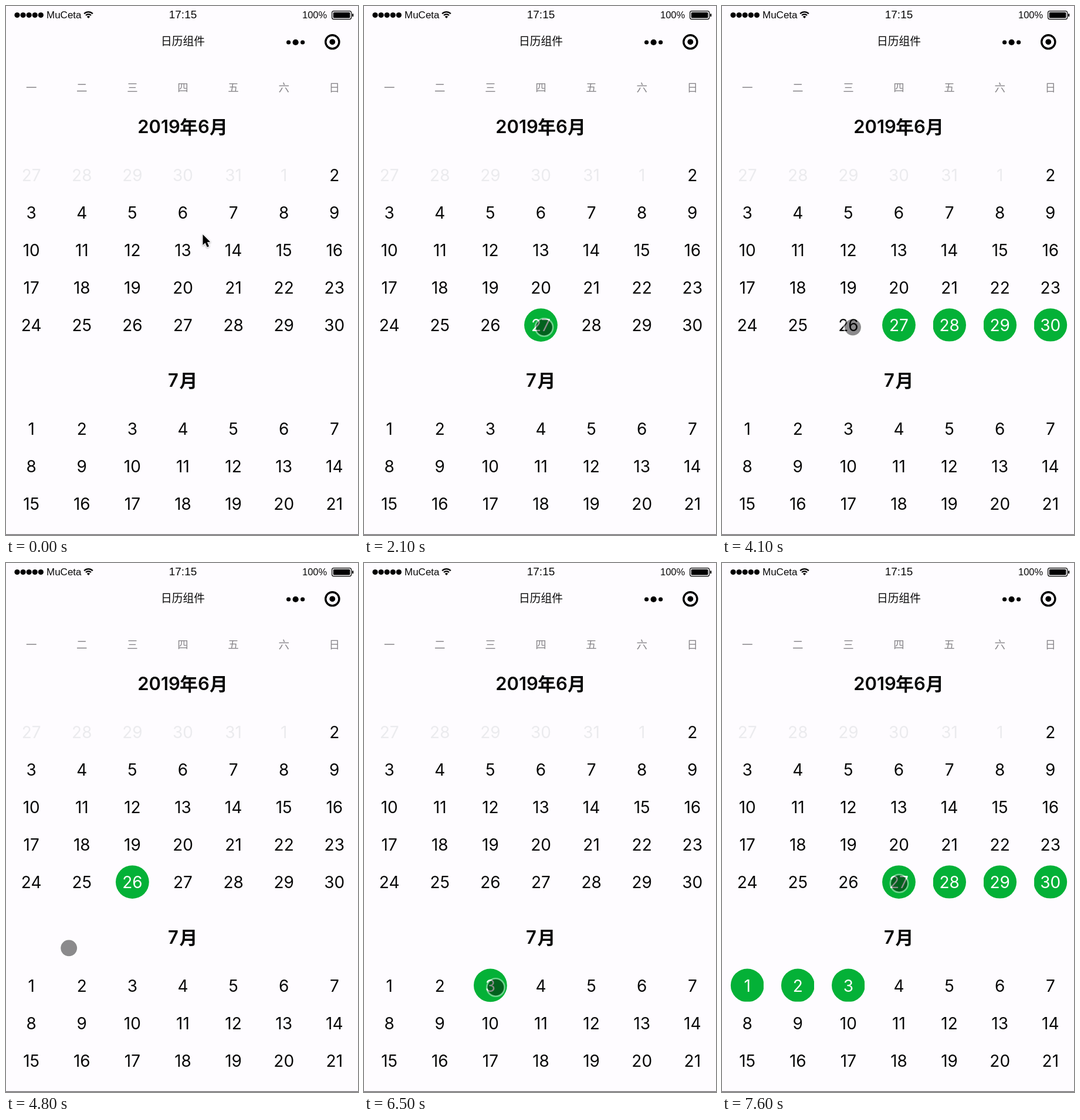
These frames come from a looping animation (600 px wide and 903 px high, 7700 ms). An HTML page with a canvas:

```html
<!DOCTYPE html>
<html lang="zh-CN">
<head>
<meta charset="utf-8">
<title>日历组件</title>
<style>
  html, body { margin: 0; width: 100%; height: 100%; overflow: hidden; background: #fefcff; }
  canvas { display: block; }
</style>
</head>
<body>
<canvas id="stage" width="600" height="903"></canvas>
<script>
const ctx = document.getElementById('stage').getContext('2d');
const LOOP = 7700, STEP = 100;
const BG = '#fefcff', INK = '#080808', GREEN = '#04b137', FADED = '#ebebee';
const LATIN = '"Inter", sans-serif';
const CJK = '"Noto Sans CJK SC", "Noto Sans CJK", sans-serif';
const STATUS = '"Liberation Sans", Arial, sans-serif';

// Day indices count from Monday 27 May; June 30 is 34, July 1 is 35.
const selections = [
  { at: 1800, from: 31, to: 31 },
  { at: 2800, from: 31, to: 34 },
  { at: 4200, from: 30, to: 30 },
  { at: 5400, from: 30, to: 35 },
  { at: 6500, from: 37, to: 37 },
  { at: 7600, from: 31, to: 37 }
];

const smooth = p => p * p * (3 - 2 * p);
const easeOut = p => 1 - (1 - p) ** 2;
const moves = [
  { start: 0, end: 500, a: [335, 389], b: [306, 549], bow: 0, ease: smooth },
  { start: 2100, end: 2500, a: [307, 548.5], b: [556, 558.5], bow: 0, ease: smooth },
  { start: 3300, end: 4100, a: [556, 558.5], b: [223, 548.5], bow: -18, ease: smooth },
  { start: 4400, end: 5100, a: [223, 548.5], b: [32, 728], bow: 0, ease: smooth },
  { start: 5700, end: 6300, a: [32, 728], b: [224.5, 724.5], bow: -12, ease: easeOut },
  { start: 6700, end: 7200, a: [224.5, 724.5], b: [302, 547], bow: 0, ease: smooth }
];

function pointerAt(t) {
  if (t >= 1500 && t < 2100) return moves[1].a;
  const { start, end, a, b, bow, ease } = moves.filter(m => m.start <= t).pop();
  const p = ease(Math.min(1, (t - start) / (end - start)));
  return [
    a[0] + (b[0] - a[0]) * p,
    a[1] + (b[1] - a[1]) * p + bow * Math.sin(Math.PI * p)
  ];
}

function text(str, x, y, font, color = INK, align = 'center') {
  ctx.font = font;
  ctx.fillStyle = color;
  ctx.textAlign = align;
  ctx.fillText(str, x, y);
}

function disc(x, y, r, color) {
  ctx.fillStyle = color;
  ctx.beginPath();
  ctx.arc(x, y, r, 0, Math.PI * 2);
  ctx.fill();
}

function ring(x, y, r, width, color) {
  ctx.strokeStyle = color;
  ctx.lineWidth = width;
  ctx.beginPath();
  ctx.arc(x, y, r, 0, Math.PI * 2);
  ctx.stroke();
}

const columnX = col => 43.2 + 86.1 * col;

function drawStatusBar() {
  for (let i = 0; i < 5; i++) disc(19 + 10.1 * i, 15.5, 4.6, '#000');
  text('MuCeta', 69, 21, '17px ' + STATUS, INK, 'left');
  text('17:15', 301.5, 21, '19px ' + STATUS);
  text('100%', 505, 21, '16.5px ' + STATUS, INK, 'left');

  const spread = Math.PI / 4;
  ctx.strokeStyle = '#000';
  ctx.lineWidth = 2.3;
  for (const r of [6.3, 10.4]) {
    ctx.beginPath();
    ctx.arc(140.5, 20.5, r, -Math.PI / 2 - spread, -Math.PI / 2 + spread);
    ctx.stroke();
  }
  ctx.fillStyle = '#000';
  ctx.beginPath();
  ctx.moveTo(140.5, 21);
  ctx.arc(140.5, 21, 3.8, -Math.PI / 2 - spread, -Math.PI / 2 + spread);
  ctx.fill();

  ctx.lineWidth = 1.2;
  ctx.beginPath();
  ctx.roundRect(555.6, 8.6, 33, 14, 3);
  ctx.stroke();
  ctx.beginPath();
  ctx.roundRect(557.8, 10.8, 28.6, 9.6, 1.5);
  ctx.roundRect(590, 13, 2.2, 5.2, 1);
  ctx.fill();
}

function drawHeader() {
  text('日历组件', 301.5, 67.2, '18.75px ' + CJK);
  disc(481.6, 62, 3.6, '#000');
  disc(493.6, 62, 5.1, '#000');
  disc(505.6, 62, 3.6, '#000');
  ring(556.3, 61.3, 11.6, 3.4, '#000');
  disc(556.3, 61.3, 4.9, '#000');
  [...'一二三四五六日'].forEach((day, col) =>
    text(day, columnX(col), 146, '18.5px ' + CJK, '#88868a'));

  const digits = '600 31px ' + LATIN, han = '600 31px ' + CJK;
  text('2019', 260.5, 217.3, digits);
  text('年', 311.5, 217.8, han);
  text('6', 337, 217.3, digits);
  text('月', 362.5, 217.8, han);
  text('7', 285, 650.3, digits);
  text('月', 311, 650.8, han);
}

function drawDay(index, selection) {
  const july = index >= 35;
  const col = index % 7, row = Math.floor(index / 7);
  const x = columnX(col), y = july ? 721.3 + 64 * (row - 5) : 289 + 64 * row;
  const day = july ? index - 34 : index < 5 ? index + 27 : index - 4;
  const selected = selection && index >= selection.from && index <= selection.to;

  if (selected) {
    ctx.save();
    if (index !== selection.from) {
      // Cells after the first lose a sliver at one side and the bottom.
      ctx.beginPath();
      ctx.rect(x - (col < 4 ? 29 : 27.7), y - 30, 56.7, 57.5);
      ctx.clip();
    }
    disc(x, y - 0.4, 28.4, GREEN);
    ctx.restore();
  }
  text(day, x, y + 10.2, '28px ' + LATIN, selected ? '#fff' : index < 6 ? FADED : INK);
}

function drawArrow(x, y) {
  ctx.save();
  ctx.translate(x, y);
  ctx.beginPath();
  [[0.5, 1], [0.5, 19], [4.6, 15.2], [7.8, 22.6], [11, 21.2], [7.9, 14], [13.2, 13.7]]
    .forEach(([px, py]) => ctx.lineTo(px, py));
  ctx.closePath();
  ctx.shadowColor = 'rgba(0,0,0,.35)';
  ctx.shadowBlur = 3;
  ctx.shadowOffsetY = 1;
  ctx.strokeStyle = '#fff';
  ctx.lineWidth = 2;
  ctx.lineJoin = 'round';
  ctx.stroke();
  ctx.shadowColor = 'transparent';
  ctx.fillStyle = '#000';
  ctx.fill();
  ctx.restore();
}

function drawTouch(x, y) {
  disc(x, y, 14, 'rgba(0,0,0,.45)');
  ring(x, y, 15.2, 2.6, 'rgba(255,255,255,.42)');
}

function draw(now) {
  const t = Math.floor((now % LOOP) / STEP) * STEP;
  const selection = selections.filter(s => s.at <= t).pop();

  ctx.fillStyle = BG;
  ctx.fillRect(0, 0, 600, 903);
  drawStatusBar();
  drawHeader();
  for (let i = 0; i < 56; i++) drawDay(i, selection);
  ctx.fillStyle = '#69676a';
  ctx.fillRect(0, 901.7, 600, 1.3);

  const [x, y] = pointerAt(t);
  (t < 1500 ? drawArrow : drawTouch)(x, y);
}

const origin = performance.now();
function tick() {
  draw(performance.now() - origin);
  requestAnimationFrame(tick);
}
tick();
</script>
</body>
</html>
```
